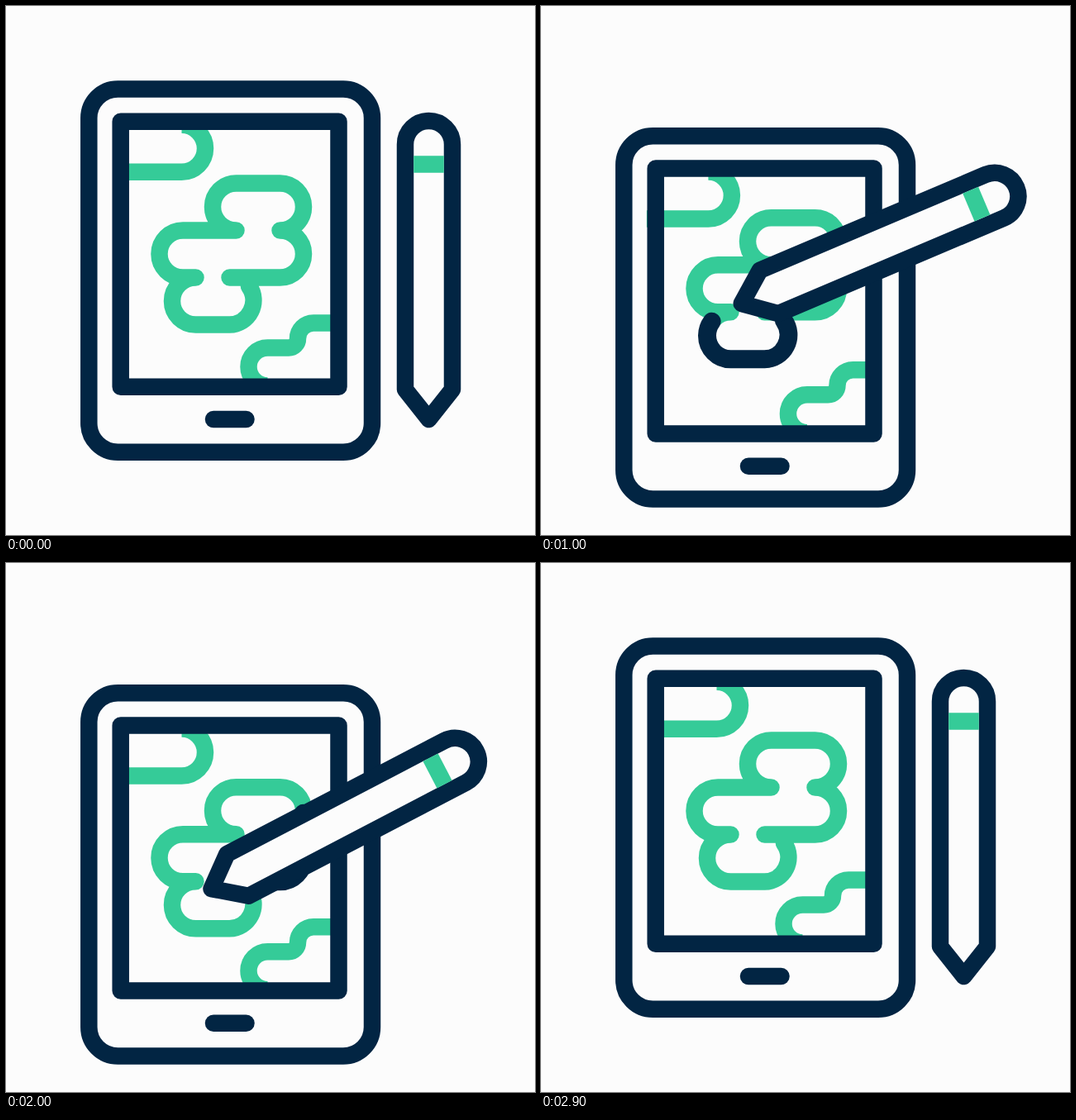
An HTML page that plays this animation: 640x640 px, repeating every 3000 ms.

```html
<!DOCTYPE html>
<html lang="en">
<head>
<meta charset="utf-8">
<title>Tablet and pen</title>
<style>
  html, body { margin: 0; width: 100%; height: 100%; overflow: hidden; background: #fcfcfc; }
  svg { display: block; width: 100vw; height: 100vh; fill: none; stroke: #022543; stroke-width: 20.5; }
  .land { stroke: #35cb98; }
  .round { stroke-linecap: round; stroke-linejoin: round; }
</style>
</head>
<body>
<svg viewBox="0 0 640 640">
  <defs>
    <path id="island" pathLength="1" d="M294 339A29.5 29.5 0 0 1 270.5 385.5H229.5a28.5 28.5 0 0 1 0-57H214
      a28.5 28.5 0 0 1 0-57H278.5a28.5 28.5 0 0 1 0-57H331.5a28.5 28.5 0 0 1 0 57a28.5 28.5 0 0 1 0 57H270.5"/>
  </defs>
  <g id="tablet">
    <path id="west" class="land" d="M138 200.8H212.5a28.5 28.5 0 0 0 0-57"/>
    <path id="east" class="land" d="M393 383.5H372a19 19 0 0 0-19 19a11 11 0 0 1-11 11H316.5a23 23 0 0 0 0 46"/>
    <g id="middle" class="round">
      <use href="#island" class="land"/>
      <use href="#island" id="ink" stroke-width="22"/>
    </g>
    <rect x="100.3" y="100.5" width="342.7" height="439.3" rx="35"/>
    <rect class="round" x="138.7" y="139.7" width="263.8" height="321"/>
    <path class="round" d="M251 500H290.5"/>
    <g id="pen">
      <path class="round" fill="#fcfcfc" d="M483 167.5a28.5 28.5 0 0 1 57 0V464L511.5 500L483 464Z"/>
      <path class="land" d="M493.2 191.5H529.8"/>
    </g>
  </g>
</svg>
<script>
const LOOP = 3000;
const el = id => document.getElementById(id);
const move = (id, x, y, extra = '') => el(id).setAttribute('transform', `translate(${x} ${y})${extra}`);

// Eased 0 to 1 between two times
const ease = (t, from, to) => {
  const s = Math.min(1, Math.max(0, (t - from) / (to - from)));
  return s * s * (3 - 2 * s);
};

function draw(t) {
  const drop = ease(t, 20, 785) - ease(t, 1990, 2765);
  const reach = ease(t, 60, 865) - ease(t, 1940, 2705);
  const lift = ease(t, 800, 1385) - ease(t, 1385, 1990);

  move('tablet', 0, 56.8 * drop);
  move('west', -37 * lift, 0);
  move('east', 20 * lift, 0);
  move('middle', 0, -55 * lift);
  move('pen', -117.5 * reach + 7.5 * lift, -74.5 * reach - 76 * lift,
    ` rotate(${63.6 * reach + 12.6 * lift} 511.5 333.5)`);

  // The ink is drawn, then wiped from its start
  const head = ease(t, 780, 1500), tail = ease(t, 1500, 2250), ink = el('ink');
  ink.style.display = head - tail > 0.001 ? '' : 'none';
  ink.setAttribute('stroke-dasharray', `${head - tail} 2`);
  ink.setAttribute('stroke-dashoffset', -tail);
}

const start = performance.now();
function tick() {
  draw((performance.now() - start) % LOOP);
  requestAnimationFrame(tick);
}
tick();
</script>
</body>
</html>
```
